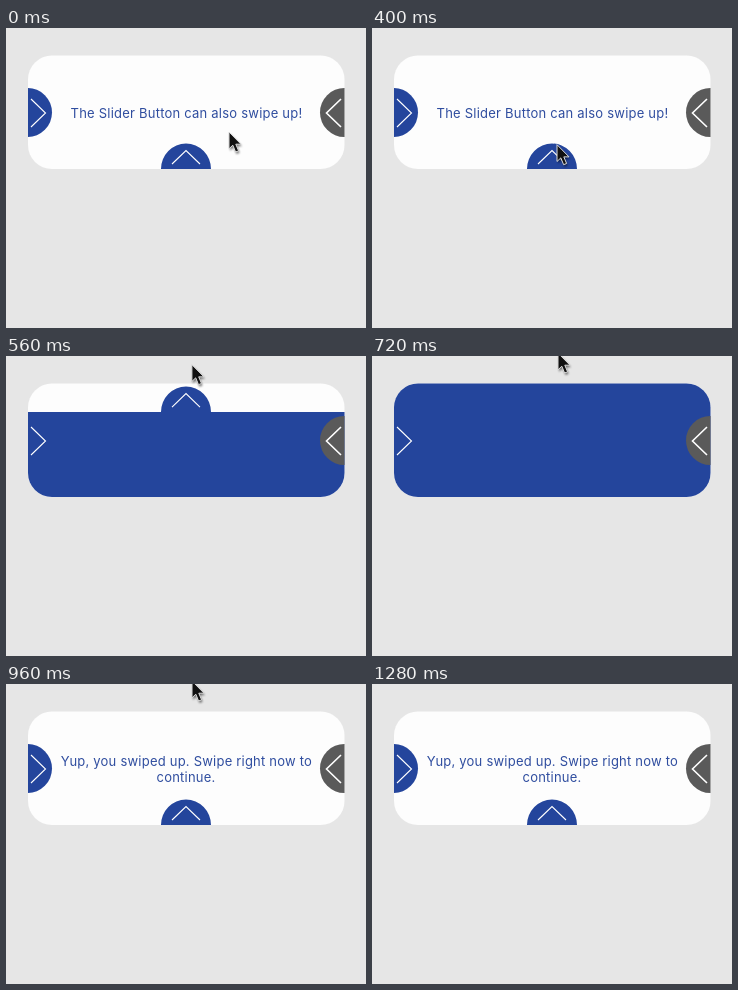
Write an HTML page that moves like this. It is 360 px wide and 300 px high and loops after 1600 ms.

```html
<!DOCTYPE html>
<html lang="en">
<head>
<meta charset="utf-8">
<title>Swipe card</title>
<style>
  html, body { margin: 0; height: 100%; overflow: hidden; background: #e6e6e6; }
  svg { display: block; }
  text { font: 13px Inter, sans-serif; letter-spacing: .22px; fill: #2f4d9f; text-anchor: middle; }
  .chevron { fill: none; stroke: #fff; stroke-width: 1.1; }
</style>
</head>
<body>
<svg width="360" height="300" viewBox="0 0 360 300">
  <defs>
    <clipPath id="card"><rect x="22" y="27.5" width="316.5" height="113.5" rx="24"/></clipPath>
    <filter id="soft" x="-50%" y="-50%" width="200%" height="200%"><feGaussianBlur stdDeviation="1.3"/></filter>
    <path id="arrow" d="M0 0V16.8L3.8 13.2L6.6 20L9.6 18.8L6.8 12.2H12Z"/>
  </defs>
  <g clip-path="url(#card)">
    <rect x="21" y="27" width="318" height="115" fill="#fdfdfd"/>
    <text id="before" x="180.5" y="90">The Slider Button can also swipe up!</text>
    <g id="after">
      <text x="180.5" y="81.5">Yup, you swiped up. Swipe right now to</text>
      <text x="180" y="97.5">continue.</text>
    </g>
    <circle cx="21.5" cy="84.5" r="24.5" fill="#24459c"/>
    <g id="panel">
      <path fill="#24459c" d="M21 141H155A25 25.5 0 0 1 205 141H339V257H21Z"/>
      <path class="chevron" d="M166 136L180 122.5L194 136"/>
    </g>
    <circle cx="338.5" cy="84.5" r="24.5" fill="#5a5a5a"/>
    <path class="chevron" d="M25 71L39.5 85L25 99"/>
    <path class="chevron" style="stroke-width:1.6" d="M335 71L320.5 85L335 99"/>
  </g>
  <g id="cursor">
    <use href="#arrow" x="1" y="2" opacity=".55" filter="url(#soft)"/>
    <use href="#arrow" fill="#111" stroke="#ddd" stroke-width="1"/>
  </g>
</svg>
<script>
  const LOOP = 1600, TICK = 80, RESET = 960, LEAVE = 1280;
  const $ = id => document.getElementById(id);

  // Smooth 0..1 progress between two times
  function ease(t, start, end) {
    const p = Math.min(1, Math.max(0, (t - start) / (end - start)));
    return p * p * (3 - 2 * p);
  }

  function move(id, x, y) {
    $(id).setAttribute("transform", `translate(${x} ${y})`);
  }

  function show(id, on) {
    $(id).setAttribute("visibility", on ? "visible" : "hidden");
  }

  function draw(now) {
    const t = Math.floor(now % LOOP / TICK) * TICK;
    const done = t >= RESET;
    const reach = ease(t, 0, 240), swipe = ease(t, 382, 602);
    move("cursor", 223 - 38 * reach + swipe, 104 + 15 * reach - 122 * swipe);
    // The panel trails the pointer
    move("panel", 0, done ? 0 : -115 * ease(t, 433, 624));
    show("before", !done);
    show("after", done);
    show("cursor", t < LEAVE);
    requestAnimationFrame(draw);
  }
  draw(performance.now());
</script>
</body>
</html>
```
